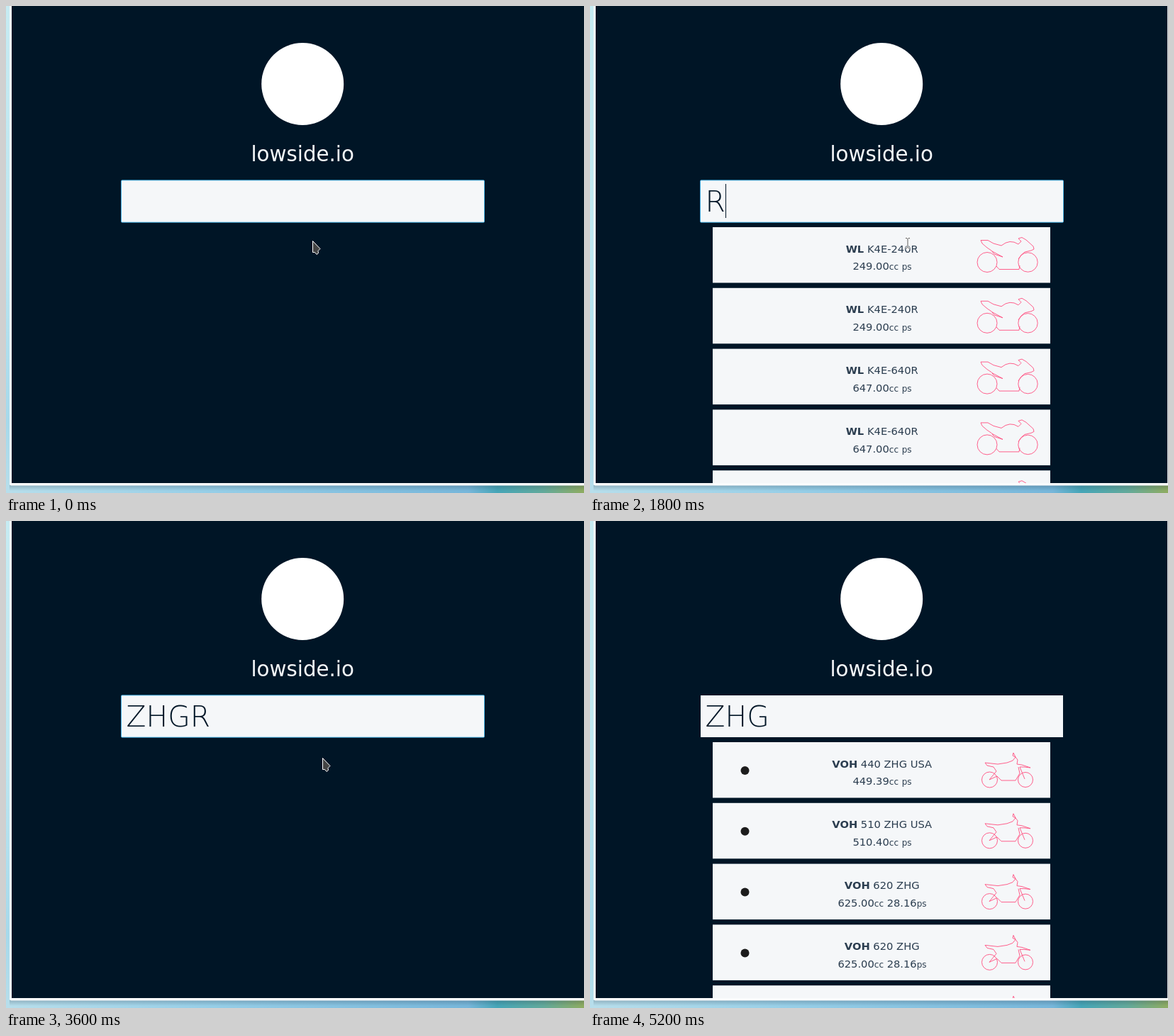
An HTML page for the animation above (5.3 s loop, 815 by 687 pixels).

```html
<!DOCTYPE html>
<html lang="en">
<head>
<meta charset="utf-8">
<title>Search</title>
<style>
  html, body { margin: 0; width: 100%; height: 100%; overflow: hidden; }
  svg { display: block; width: 815px; height: 687px; }
  text { font-family: "DejaVu Sans", sans-serif; }
  .title { font-size: 29.3px; fill: #f5f7f9; text-anchor: middle; }
  .query { font-size: 40.8px; font-weight: 200; fill: #001526; }
  .row { font-size: 14.7px; fill: #2c3e50; text-anchor: middle; }
  .unit { font-size: 12px; }
  .maker { font-weight: bold; }
  .bike { fill: none; stroke: #ff4f7f; stroke-width: .9; stroke-linejoin: round; }
</style>
</head>
<body>
<svg viewBox="0 0 815 687">
  <defs>
    <linearGradient id="side" x2="0" y2="1">
      <stop offset="0" stop-color="#c6ebf2"/>
      <stop offset=".5" stop-color="#bde6f0"/>
      <stop offset=".85" stop-color="#a6d9eb"/>
      <stop offset="1" stop-color="#b7deeb"/>
    </linearGradient>
    <linearGradient id="floor">
      <stop offset="0" stop-color="#b7deeb"/>
      <stop offset=".35" stop-color="#96cee7"/>
      <stop offset=".8" stop-color="#76b6da"/>
      <stop offset=".85" stop-color="#45a5b7"/>
      <stop offset=".93" stop-color="#62a99a"/>
      <stop offset="1" stop-color="#8fac60"/>
    </linearGradient>
    <linearGradient id="shade" x2="0" y2="1">
      <stop offset="0" stop-color="#234" stop-opacity=".25"/>
      <stop offset="1" stop-color="#234" stop-opacity="0"/>
    </linearGradient>
    <clipPath id="view"><path d="M8 0H815V673H8z"/></clipPath>
    <g id="sport" class="bike">
      <circle cx="560" cy="361.5" r="14"/>
      <circle cx="617.5" cy="361.5" r="13.7"/>
      <path d="M573 367L577 371.5 605 371.5 606 366M604 357Q608 350 613 347L622 345 626 343 625 339 615 330 609 326.5 604 328 608 332 604 336Q592 328 580 338L569 335 561 330.5 551 330.5 553 335 560 341 566 345 570 350 582 354 567 346"/>
    </g>
    <g id="dirt" class="bike">
      <circle cx="563.5" cy="365" r="11"/>
      <circle cx="614" cy="365" r="10.5"/>
      <path d="M557 341L575 343 588 341 596 338 600 333 596 331 597 327 600 333 603 337 602 343 609 344 621 348 612 347 606 347 613 364M604 347L606 356 600 366 580 366 574 360 563 365 573 353 569 347 560 345 557 341"/>
    </g>
  </defs>
  <path fill="url(#floor)" d="M0 0H815V687H0z"/>
  <path fill="url(#side)" d="M0 0H8V687H0z"/>
  <path fill="url(#shade)" d="M5 676H815V684H5z"/>
  <path fill="#fbfcfd" d="M5 0H815V676.5H7L5 675z"/>
  <path fill="#001526" d="M8 0H815V673H8z"/>
  <g id="page">
    <circle cx="418.2" cy="110" r="58" fill="#fff"/>
    <text class="title" x="418.2" y="219">lowside.io</text>
    <rect x="163" y="246" width="511" height="59" fill="#f5f7f9"/>
    <rect id="focus" x="162.5" y="245.8" width="512" height="59.4" rx="1" fill="none" stroke="#45aee0"/>
    <text id="query" class="query" x="169.5" y="290"></text>
    <rect id="caret" y="251" width="1" height="48" fill="#001526"/>
  </g>
  <g id="list" clip-path="url(#view)"></g>
  <path id="edge" d="M814 0H815V673H814z" fill="#d5dade"/>
  <path id="arrow" d="M.5.5V16.5L3.5 16.5 6 19.5 8.5 17.5 8 14.5 11 11.5z" fill="#444" stroke="#fff"/>
  <g id="beam" fill="none">
    <path d="M-3 .5H-1L0 1.5 1 .5H3M0 1.5V13.5M-3 14.5H-1L0 13.5 1 14.5H3" stroke="#fff" stroke-width="3"/>
    <path d="M-3 .5H-1L0 1.5 1 .5H3M0 1.5V13.5M-3 14.5H-1L0 13.5 1 14.5H3" stroke="#555"/>
  </g>
</svg>
<script>
const LOOP = 5300;
const BLUR_AT = 5200;
const SCROLLBAR_SHIFT = -7;
const $ = id => document.getElementById(id);

// Result sets: bike shape, badge, then rows of maker, model, displacement, power.
const lists = {
  short: { bike: 'sport', rows: [
    ['WL', 'K4E-240R', '249.00', ''], ['WL', 'K4E-240R', '249.00', ''],
    ['WL', 'K4E-640R', '647.00', ''], ['WL', 'K4E-640R', '647.00', '']] },
  long: { bike: 'sport', rows: [
    ['WL', 'Reverie 240 Touring Limited ABS', '249.00', ''], ['WL', 'Reverie 240 Touring', '249.00', ''],
    ['WL', 'Reverie 640 Touring Limited ABS', '647.00', ''], ['WL', 'Reverie 640 Touring', '647.00', '']] },
  enduro: { bike: 'dirt', badge: true, rows: [
    ['VOH', '440 ZHG USA', '449.39', ''], ['VOH', '510 ZHG USA', '510.40', ''],
    ['VOH', '620 ZHG', '625.00', '28.16'], ['VOH', '620 ZHG', '625.00', '28.16']] }
};

// time, query, caret, list, pointer [kind, x, y]
const arrowLow = ['arrow', 432, 331], arrowRest = ['arrow', 446, 334], beamRest = ['beam', 448, 327];
const steps = [
  [0, '', 0, null, arrowLow],
  [100, '', 1, null, arrowLow],
  [500, 'R', 1, 'short', arrowLow],
  [600, 'RE', 1, 'long', arrowLow],
  [900, 'RE', 1, 'long', ['arrow', 439, 332]],
  [1000, 'RE', 1, 'long', beamRest],
  [1200, 'RE', 0, 'long', beamRest],
  [1800, 'R', 1, 'short', beamRest],
  [2000, '', 1, 'short', beamRest],
  [2400, 'Z', 1, 'short', beamRest],
  [2600, 'ZH', 1, 'enduro', beamRest],
  [2700, 'ZHG', 1, 'enduro', beamRest],
  [3000, 'ZHGR', 1, null, arrowRest],
  [3600, 'ZHGR', 0, null, arrowRest],
  [3700, 'ZHG', 0, 'enduro', beamRest],
  [4200, 'ZHG', 1, 'enduro', beamRest],
  [4700, 'ZHG', 0, 'enduro', beamRest],
  [4800, 'ZHG', 0, 'enduro', ['arrow', 439, 325]],
  [4900, 'ZHG', 0, 'enduro', ['arrow', 430, 0]],
  [5000, 'ZHG', 0, 'enduro', null],
  [BLUR_AT, 'ZHG', 0, 'enduro', null]
];

const show = (id, on) => $(id).style.display = on ? '' : 'none';
const unit = name => `<tspan class="unit">${name}</tspan>`;

function card({ bike, badge }, row, i) {
  const texts = row ? `
    <text class="row" x="411.7" y="347.5"><tspan class="maker">${row[0]}</tspan> ${row[1]}</text>
    <text class="row" x="412" y="372.3">${row[2]}${unit('cc')} ${row[3]}${unit('ps')}</text>` : '';
  return `<g transform="translate(0 ${i * 85.8})">
    <rect x="173" y="312" width="476" height="78.5" fill="#f5f7f9"/>
    ${badge ? '<circle cx="218.5" cy="352" r="6" fill="#1c1c1c"/>' : ''}
    ${texts}<use href="#${bike}"/></g>`;
}

const markup = {};
for (const [name, list] of Object.entries(lists)) {
  markup[name] = [...list.rows, null].map((row, i) => card(list, row, i)).join('');
}

let shownList = null;

function render([time, query, caret, list, pointer]) {
  $('page').setAttribute('transform', `translate(${list ? SCROLLBAR_SHIFT : 0} 0)`);
  $('query').textContent = query;
  $('caret').setAttribute('x', 170 + Math.round($('query').getComputedTextLength()));
  show('caret', caret);
  show('focus', time < BLUR_AT);
  show('edge', list);
  if (list !== shownList) $('list').innerHTML = markup[list] || '';
  shownList = list;
  for (const kind of ['arrow', 'beam']) show(kind, pointer && pointer[0] === kind);
  if (pointer) $(pointer[0]).setAttribute('transform', `translate(${pointer[1]} ${pointer[2]})`);
}

const start = performance.now();
let current;

function tick() {
  const time = (performance.now() - start) % LOOP;
  const step = steps.findLast(s => s[0] <= time);
  if (step !== current) render(current = step);
  requestAnimationFrame(tick);
}
tick();
</script>
</body>
</html>
```
